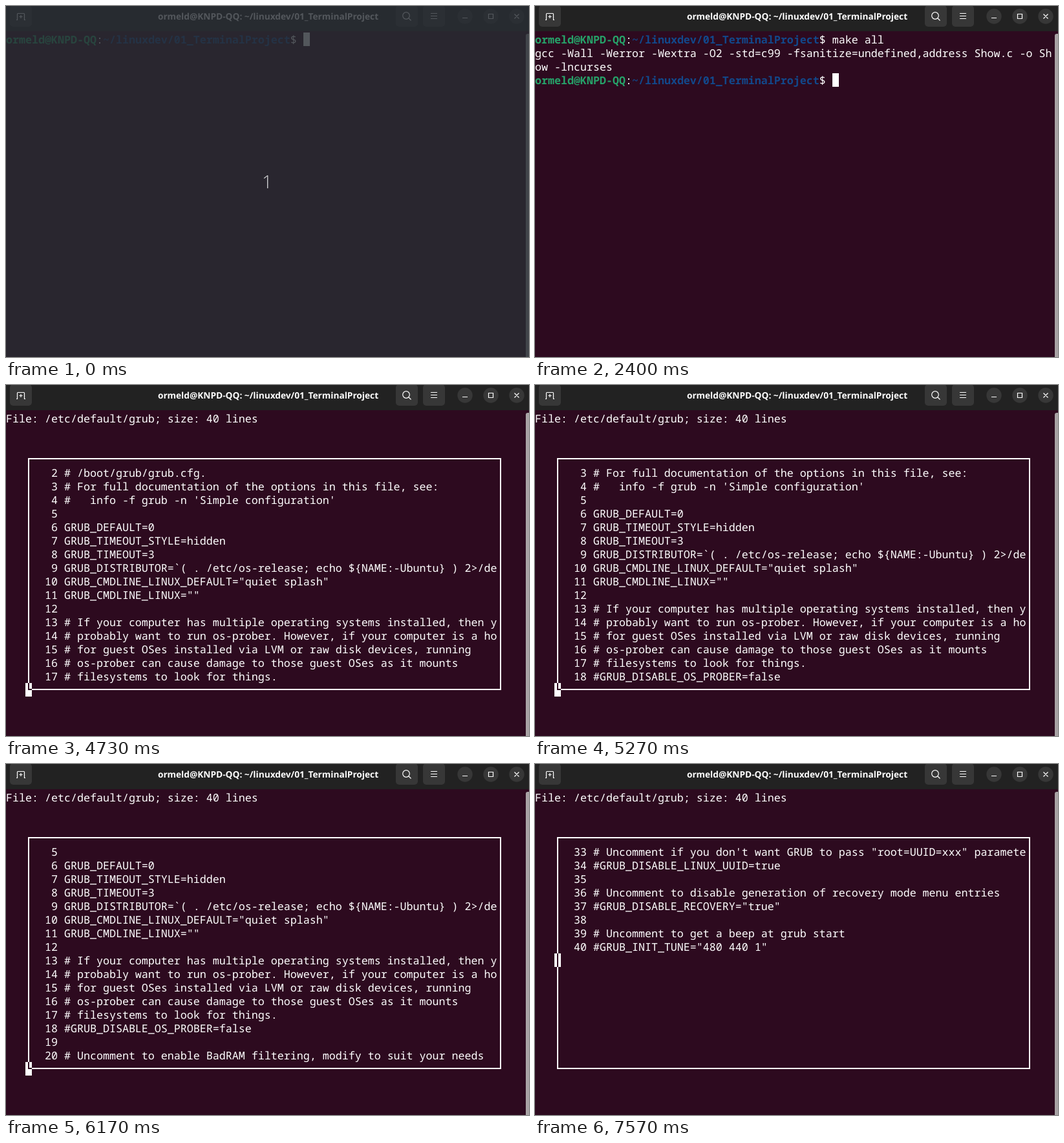
An HTML page that plays this animation: 809x543 px, repeating every 8000 ms.

```html
<!DOCTYPE html>
<html lang="en">
<head>
<meta charset="utf-8">
<title>Terminal file viewer</title>
<style>
  html, body { margin: 0; width: 100%; height: 100%; overflow: hidden; background: #2d0a1f; }
  svg { display: block; width: 809px; height: 543px; }
  text { fill: #fff; white-space: pre; text-rendering: geometricPrecision; }
  #rows { font: 16.6667px "Noto Sans Mono", "DejaVu Sans Mono", monospace; }
  #title { font: 600 13.7px "Noto Sans", "Open Sans", sans-serif; text-anchor: middle; }
  #count { font: 300 28px "Open Sans", "Noto Sans", sans-serif; text-anchor: middle; fill: #d4d5d6; }
  .user { font-weight: 700; fill: #26a269; }
  .path { font-weight: 700; fill: #12488b; }
  .button { fill: #373737; }
  .icon { fill: none; stroke: #fff; stroke-width: 1.2; }
</style>
</head>
<body>
<svg viewBox="0 0 809 543">
  <rect width="809" height="543" fill="#2d0a1f"/>
  <rect width="809" height="39" fill="#222"/>
  <g class="button">
    <rect x="6" y="-1" width="34" height="33" rx="5"/>
    <rect x="603" y="-1" width="34" height="33" rx="5"/>
    <rect x="645" y="-1" width="34" height="33" rx="5"/>
    <circle cx="710" cy="16" r="11.7"/>
    <circle cx="750" cy="16" r="11.7"/>
    <circle cx="790" cy="16" r="11.7"/>
  </g>
  <g class="icon">
    <path d="M16 21.5h1.5v-9q0-1 1-1h9q1 0 1 1v9h1.500M23 14v5M20.500 16.500h5"/>
    <circle cx="619" cy="15" r="5.3"/>
    <path d="M623 19l3.500 3.500M657 11.500h10M657 15.500h10M657 19.500h10"/>
    <path d="M706 18.500h8M746.500 12.500h7v7h-7zM786.500 12.500l7 7M793.500 12.500l-7 7"/>
  </g>
  <text id="title" x="405.5" y="21"></text>
  <rect x="804" y="43" width="7" height="504" rx="3" fill="#a8a3a5"/>
  <rect id="frame" x="35" y="114" width="730" height="357" fill="none" stroke="#fff" stroke-width="2"/>
  <g id="rows"></g>
  <g id="cursor">
    <rect width="10" height="21" fill="#fff"/>
    <path id="under" fill="none" stroke="#2d0a1f" stroke-width="2"/>
  </g>
  <g id="dim">
    <rect width="809" height="543" fill="#282d34" opacity=".8"/>
    <text id="count" x="404" y="282">1</text>
  </g>
</svg>
<script>
const LOOP = 8000, COL = 10, ROW = 21, TOP = 41, PAGE = 16, PROMPT_COLS = 46;
const USER = "ormeld@KNPD-QQ", PATH = "~/linuxdev/01_TerminalProject";
const BUILD = "make all", RUN = "./Show /etc/default/grub";

const FILE = `# If you change this file, run 'update-grub' afterwards to update
# /boot/grub/grub.cfg.
# For full documentation of the options in this file, see:
#   info -f grub -n 'Simple configuration'

GRUB_DEFAULT=0
GRUB_TIMEOUT_STYLE=hidden
GRUB_TIMEOUT=3
GRUB_DISTRIBUTOR=\`( . /etc/os-release; echo \${NAME:-Ubuntu} ) 2>/dev/null || echo Ubuntu\`
GRUB_CMDLINE_LINUX_DEFAULT="quiet splash"
GRUB_CMDLINE_LINUX=""

# If your computer has multiple operating systems installed, then you
# probably want to run os-prober. However, if your computer is a host
# for guest OSes installed via LVM or raw disk devices, running
# os-prober can cause damage to those guest OSes as it mounts
# filesystems to look for things.
#GRUB_DISABLE_OS_PROBER=false

# Uncomment to enable BadRAM filtering, modify to suit your needs
# This works with Linux (no patch required) and with any kernel that obtains
# the memory map information from GRUB (GNU Mach, kernel of FreeBSD ...)
#GRUB_BADRAM="0x01234567,0xfefefefe,0x89abcdef,0xefefefef"

# Uncomment to disable graphical terminal
#GRUB_TERMINAL=console

# The resolution used on graphical terminal
# note that you can use only modes which your graphic card supports via VBE
# you can see them in real with the command \`vbeinfo'
#GRUB_GFXMODE=640x480

# Uncomment if you don't want GRUB to pass "root=UUID=xxx" parameter to Linux
#GRUB_DISABLE_LINUX_UUID=true

# Uncomment to disable generation of recovery mode menu entries
#GRUB_DISABLE_RECOVERY="true"

# Uncomment to get a beep at grub start
#GRUB_INIT_TUNE="480 440 1"`.split("\n");

const KEY_TIMES = [500, 600, 800, 1100, 1200, 1300, 1430, 1600];
const RECALLED = [[0, ""], [2700, BUILD], [2800, "./Show"], [2900, BUILD], [3030, "./Show"], [3130, RUN]];
const CURSOR_OFF = [[3730, 3830], [4430, 4730], [7070, 7170]];

const $ = id => document.getElementById(id);
const show = (id, on) => $(id).setAttribute("visibility", on ? "visible" : "hidden");
const valueAt = (steps, t) => steps.filter(([start]) => start <= t).pop()[1];

// Key repeat moves one line about every 33 ms.
function topLine(t) {
  const repeats = start => 1 + Math.floor((t - start + 1) / 33.4);
  if (t < 4730) return 1;
  if (t < 5270) return 2;
  if (t < 5600) return Math.min(9, 2 + repeats(5270));
  if (t < 6100) return 8;
  if (t < 7170) return Math.max(1, 8 - repeats(6100));
  return t < 7570 ? 17 : 33;
}

const plain = text => [[text, ""]];
const prompt = command => [[USER, "user"], [":", ""], [PATH, "path"], ["$ " + command, ""]];

function shell(t) {
  const typed = BUILD.slice(0, KEY_TIMES.filter(k => k <= t).length);
  const rows = [prompt(typed)];
  let cursor = [PROMPT_COLS + typed.length, 0];
  if (t >= 2100) cursor = [0, 1];
  if (t >= 2130) {
    rows.push(plain("gcc -Wall -Werror -Wextra -O2 -std=c99 -fsanitize=undefined,address Show.c -o Sh"),
              plain("ow -lncurses"));
    cursor = [0, 3];
  }
  if (t >= 2400) {
    const command = valueAt(RECALLED, t);
    rows.push(prompt(command));
    cursor = [PROMPT_COLS + command.length, 3];
  }
  if (t >= 3830) cursor = [0, 4];
  return { rows, cursor, under: "" };
}

function viewer(t) {
  const top = topLine(t);
  const lines = FILE.slice(top - 1, top - 1 + PAGE);
  const rows = [plain("File: /etc/default/grub; size: 40 lines"), [], [], []];
  lines.forEach((line, i) =>
    rows.push(plain(String(top + i).padStart(8) + " " + line.slice(0, 67))));
  const full = lines.length === PAGE;
  return { rows, cursor: [3, 4 + lines.length], under: full ? "M5 0V10H10" : "M5 0V21" };
}

function rowElement(parts, index) {
  const make = name => document.createElementNS("http://www.w3.org/2000/svg", name);
  const row = make("text");
  row.setAttribute("x", 0);
  row.setAttribute("y", TOP + 17 + index * ROW);
  for (const [text, style] of parts) {
    const span = make("tspan");
    span.setAttribute("class", style);
    span.textContent = text;
    row.append(span);
  }
  return row;
}

let drawn = "";
function render(t) {
  const viewing = t >= 3870;
  const { rows, cursor: [col, row], under } = viewing ? viewer(t) : shell(t);
  const key = JSON.stringify(rows);
  if (key !== drawn) {
    $("rows").replaceChildren(...rows.map(rowElement));
    drawn = key;
  }
  $("cursor").setAttribute("transform", `translate(${col * COL} ${TOP + row * ROW})`);
  $("under").setAttribute("d", under);
  show("cursor", !CURSOR_OFF.some(([from, to]) => t >= from && t < to));
  show("frame", viewing);
  show("dim", t < 70);
}

$("title").textContent = `${USER}: ${PATH}`;
const start = performance.now();
function tick() {
  render((performance.now() - start) % LOOP);
  requestAnimationFrame(tick);
}
tick();
</script>
</body>
</html>
```
